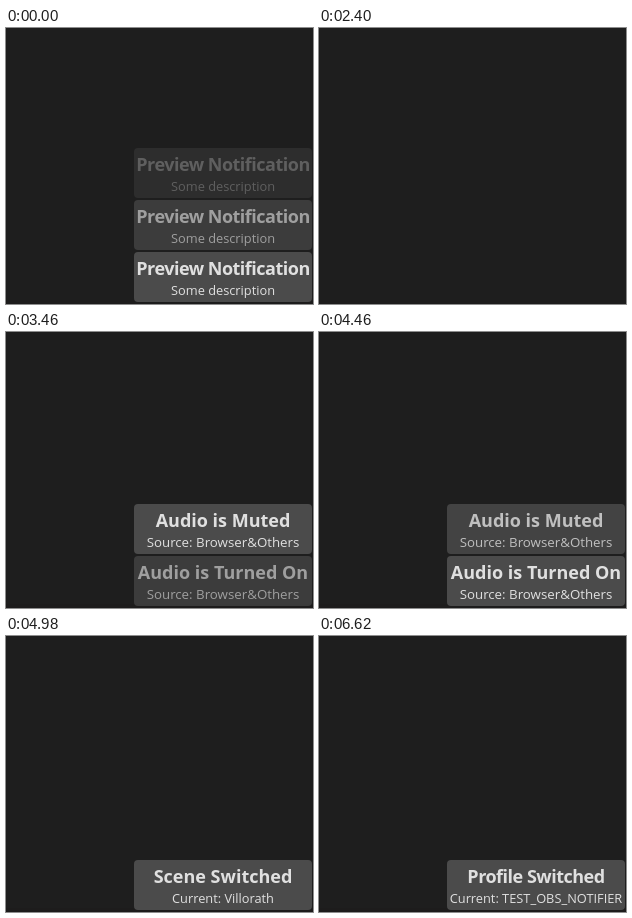
An HTML page for the animation above (8 s loop, 307 px wide and 276 px high).

```html
<!DOCTYPE html>
<html lang="en">
<head>
<meta charset="utf-8">
<title>Notifications</title>
<style>
  html, body { margin: 0; width: 100%; height: 100%; overflow: hidden; background: #1e1e1e; }
  svg { display: block; width: 307px; height: 276px; }
  text { font-family: "Open Sans", "Noto Sans", sans-serif; text-anchor: middle; fill: #e0e0e0; }
  .title { font-weight: 700; font-size: 18px; }
  .tight { letter-spacing: -0.5px; }
  .card { fill: #4b4b4b; }
</style>
</head>
<body>
<svg id="stage" viewBox="0 0 307 276">
  <rect width="307" height="276" fill="#1e1e1e"/>
  <rect y="272" width="307" height="4" fill="#1d1c1c"/>
</svg>
<script>
const LOOP = 8000, TICK = 20;
const FADE = 120;
const LEFT = 128, WIDTH = 178, HEIGHT = 50, STEP = 52, BOTTOM = 224;
const TALL = { from: 600, to: 1200, height: 86, step: 88, bottom: 190 };

const stage = document.getElementById('stage');
const clamp = v => Math.max(0, Math.min(1, v));

function add(parent, tag, attrs, text = '') {
  const el = document.createElementNS('http://www.w3.org/2000/svg', tag);
  for (const key in attrs) el.setAttribute(key, attrs[key]);
  el.textContent = text;
  parent.appendChild(el);
  return el;
}

function makeCard(title, desc, descSize, style = '') {
  const group = add(stage, 'g', { opacity: 0 });
  const box = add(group, 'rect', { class: 'card', x: LEFT, width: WIDTH, height: HEIGHT, rx: 4 });
  const label = add(group, 'g', {});
  const x = LEFT + WIDTH / 2;
  add(label, 'text', { class: `title ${style}`, x, y: 23 }, title);
  add(label, 'text', { x, y: 43, 'font-size': descSize }, desc);

  return (y, height, opacity) => {
    group.setAttribute('opacity', opacity);
    group.setAttribute('transform', `translate(0 ${y})`);
    box.setAttribute('height', height);
    label.setAttribute('transform', `translate(0 ${(height - HEIGHT) / 2})`);
  };
}

const previews = [0, 1, 2].map(slot => ({
  slot, opacity: 1 - slot / 3,
  draw: makeCard('Preview Notification', 'Some description', 12.8, 'tight')
}));

// show / hide: start and end of each fade; lift: when a newer card pushes it up
const notices = [
  { draw: makeCard('Audio is Muted', 'Source: Browser&Others', 13.3),
    show: [3000, 3100], hide: [4460, 4560], lift: 3380 },
  { draw: makeCard('Audio is Turned On', 'Source: Browser&Others', 13.3),
    show: [3380, 3500], hide: [4860, 4980], lift: 4860 },
  { draw: makeCard('Scene Switched', 'Current: Villorath', 12.8),
    show: [4860, 4980], hide: [6340, 6420], lift: LOOP },
  { draw: makeCard('Profile Switched', 'Current: TEST_OBS_NOTIFIER', 12.8, 'tight'),
    show: [6560, 6620], hide: [LOOP, LOOP], lift: LOOP }
];

function alpha({ show, hide }, t) {
  if (t < show[0] || t >= hide[1]) return 0;
  if (t >= hide[0]) return clamp((hide[1] - t) / FADE);
  return clamp(1 - (show[1] - t) / FADE);
}

function render(t) {
  const tall = t >= TALL.from && t < TALL.to;
  const size = tall ? TALL : { height: HEIGHT, step: STEP, bottom: BOTTOM };
  for (const p of previews)
    p.draw(size.bottom - p.slot * size.step, size.height, t < 2400 ? p.opacity : 0);
  for (const n of notices)
    n.draw(t < n.lift ? BOTTOM : BOTTOM - STEP, HEIGHT, alpha(n, t));
}

const start = performance.now();
function loop() {
  const t = (performance.now() - start) % LOOP;
  render(Math.floor(t / TICK) * TICK);
  requestAnimationFrame(loop);
}
loop();
</script>
</body>
</html>
```
